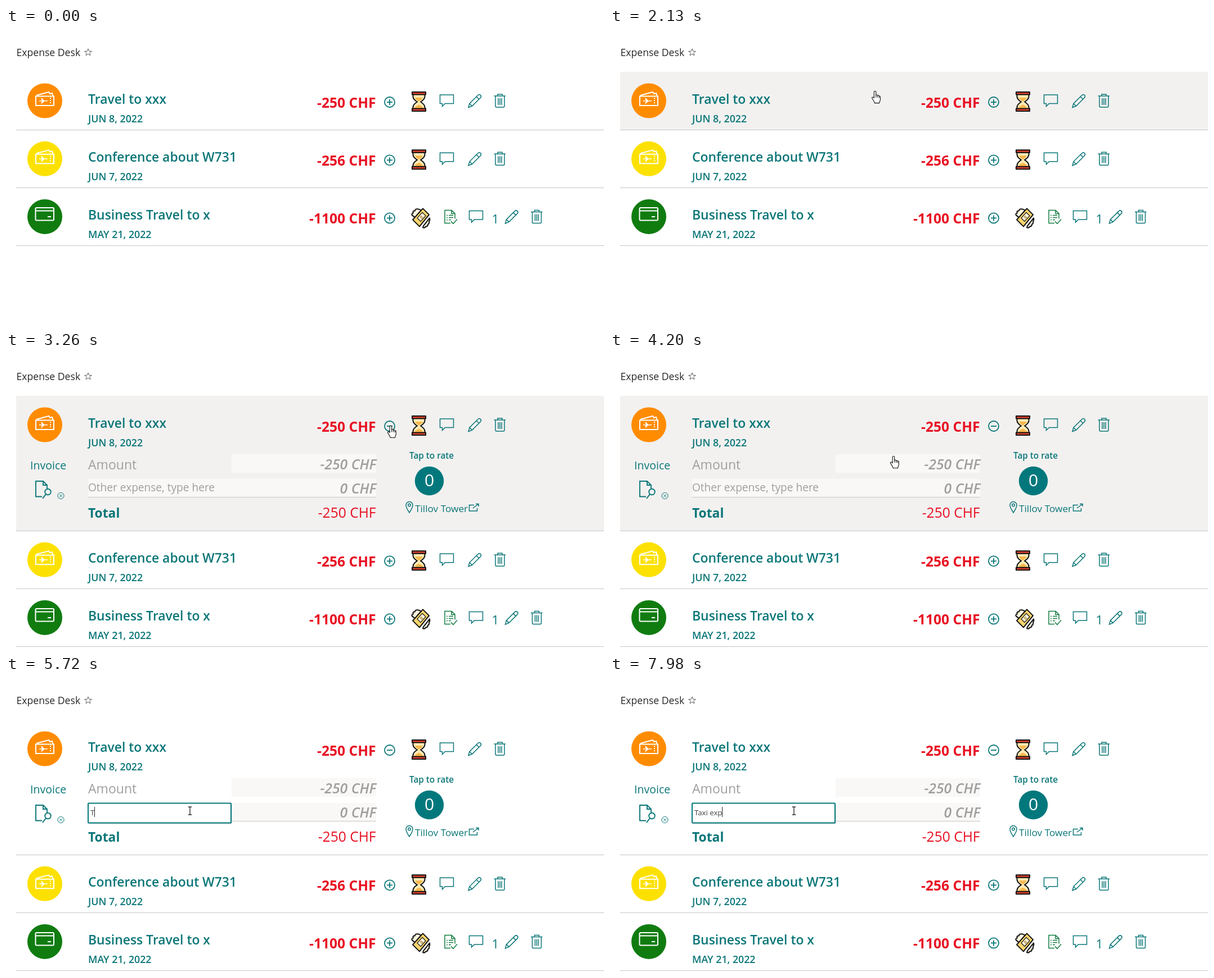
Recreate the animation shown at these times as an HTML page. Size 1063 px wide and 527 px high, loop 8000 ms.

```html
<!DOCTYPE html>
<html lang="en">
<head>
<meta charset="utf-8">
<title>Expense list</title>
<style>
  html, body { margin: 0; width: 100%; height: 100%; overflow: hidden; background: #fff; }
  svg { display: block; width: 1063px; height: 527px; font-family: "Open Sans", "Noto Sans", sans-serif; }
  text { fill: #0b7678; white-space: pre; }
  .title { font-size: 22.9px; font-weight: 600; }
  .date { font-size: 17.8px; font-weight: 600; }
  .sum { font-size: 24.6px; text-anchor: end; fill: #e81123; }
  .bold { font-weight: 700; }
  .gray { fill: #a19f9d; }
  .faded { fill: #a19f9d; font-size: 24.8px; font-style: italic; font-weight: 600; }
  .icon { fill: none; stroke: #0b7678; stroke-width: 1.5; }
  .white { fill: none; stroke: #fff; stroke-width: 2; }
  .rule { fill: #c8c6c4; shape-rendering: crispEdges; }
  .field { fill: #f9f8f7; }
  .ink { stroke: #111; stroke-width: 2; stroke-linejoin: round; }
  .cursor { fill: #fff; stroke: #111; stroke-width: 1.1; stroke-linejoin: round; }
</style>
</head>
<body>
<svg id="stage" viewBox="0 0 1063 527">
  <defs>
    <g id="ticket" class="white">
      <path d="M54 42l22-6 2 3 4-1 1.500 5M53 43.500h32v16.500h-32z"/>
      <path d="M79 46v12" stroke-dasharray="2 2"/>
      <path d="M59 51h5l-2-4h2l4 4h6v1.500h-6l-4 4h-2l2-4h-5z" fill="#fff" stroke="none"/>
    </g>
    <g id="card" class="white">
      <rect x="52.500" y="35.500" width="32.500" height="22.500" rx="2"/>
      <path d="M53 41h32M74 51.500h6"/>
    </g>
    <g id="hourglass" class="ink">
      <path d="M723.500 40v4q0 5 7.500 9.500q-7.500 4.500-7.500 10v3h21v-3q0-5.500-7.500-10q7.500-4.500 7.500-9.500v-4z" fill="#ffeab5"/>
      <path d="M727 46h14q-1 3-7 7q-6-4-7-7zM726 66q1-5 8-7.500q7 2.500 8 7.500z" fill="#f8b84c" stroke="none"/>
      <path d="M722 36h24v4.500h-24zM722 65.500h24v4.500h-24z" fill="#e0402d"/>
    </g>
    <g id="money" class="ink" fill="#fff8de">
      <path d="M722 49q-2-3 2-4q-2-4 3-4q0-4 6-3l5 2-11 13z"/>
      <path d="M742 68l11-14q1 4-1 6q1 4-2 5q0 4-4 4q-1 3-5 2z"/>
      <path d="M723 57l18-20 11 11-17 21z" fill="#f6d46c"/>
      <path d="M731 54l9-10 6 6-9 10z" stroke-width="1.300"/>
      <path d="M736 53l3-3M738 55l3-3" stroke="#a8812d" stroke-width="1.500"/>
    </g>
    <path id="comment" class="icon" d="M771.500 41h24v15.500h-15l-5 5v-5h-4z"/>
    <path id="pencil" class="icon" d="M822 63.500l2-7 15-15q2.500-2 4.500 0t0 4.500l-15 15zM836.500 44.500l4.500 4.500M824 56.500l4.500 4.500"/>
    <path id="trash" class="icon" d="M867.500 43h20.500M874 43v-3h8v3M870 43v18q0 2 2 2h12q2 0 2-2v-18M875 47v12M878 47v12M881 47v12"/>
    <path id="form" class="icon" style="stroke:#107c41" d="M790 63h-10v-23h12l6 6v9M792 40v6h6M783 49h2M787 49h8M783 53h2M787 53h8M783 57h2M787 57h4M791 60l4 4 7-8"/>
  </defs>

  <text x="18.500" y="50" style="font-size:17.600px;fill:#292827">Expense Desk</text>
  <path d="M146 37l1.700 4.300 4.700.2-3.700 2.900 1.300 4.500-4-2.600-4 2.600 1.300-4.500-3.700-2.900 4.700-.2z" fill="none" stroke="#605e5c"/>
  <g id="rows"></g>

  <g id="details">
    <text x="43" y="208.500" font-size="19.500">Invoice</text>
    <g class="icon">
      <path d="M64 257.500h-11v-27.500h13l7 7v6M66 230v7h7" stroke-width="1.900"/>
      <circle cx="74.500" cy="249" r="5.300" stroke-width="1.900"/>
      <path d="M71 253l-6 8" stroke-width="2"/>
      <g stroke-width="1"><circle cx="97.500" cy="256" r="5.600"/><path d="M95 253.500l5 5M100 253.500l-5 5"/></g>
    </g>
    <text class="gray" x="146" y="208.500" font-size="23">Amount</text>
    <rect class="field" x="401" y="182" width="257" height="33"/>
    <text class="sum faded" x="658" y="208.500">-250 CHF</text>
    <rect class="field" x="146" y="226" width="512" height="32"/>
    <rect class="rule" x="146" y="258" width="512" height="1"/>
    <text class="sum faded" x="658" y="251.500">0 CHF</text>
    <text id="hint" class="gray" x="146" y="247.500" font-size="19.100">Other expense, type here</text>
    <rect id="outline" x="146" y="226.500" width="254" height="34" fill="none" stroke="#7fb5b7"/>
    <g id="loading">
      <rect x="145" y="226" width="256" height="38" fill="#f2f1f0"/>
      <rect x="146" y="233.500" width="254" height="30" fill="#f9f9f8" stroke="#6fafb2" stroke-width="1.600"/>
      <circle cx="273.500" cy="248.500" r="9.500" fill="none" stroke="#dcdcdb"/>
      <path d="M590.500 226v32" stroke="#777"/>
    </g>
    <g id="editor">
      <rect x="147" y="228" width="255" height="36" rx="2" fill="#ddd"/>
      <rect x="146" y="226.500" width="254" height="35" rx="1" fill="#fff" stroke="#03787c" stroke-width="2"/>
      <text id="typed" x="150" y="248" font-size="13.200" style="fill:#444"></text>
      <rect id="caret" y="233" width="1" height="18" fill="#222"/>
    </g>
    <text class="bold" x="146" y="295" font-size="22.800">Total</text>
    <text class="sum" x="657.500" y="295">-250 CHF</text>
    <text x="717" y="190" font-size="15.300" font-weight="600">Tap to rate</text>
    <circle cx="752.500" cy="229.500" r="25.700" fill="#03787c"/>
    <text x="752.500" y="238.500" font-size="30" text-anchor="middle" style="fill:#fff">0</text>
    <g class="icon" stroke-width="1.300">
      <path d="M717 286q-6-9-6-13.500a6 6 0 0 1 12 0q0 4.500-6 13.500z"/><circle cx="717" cy="272.500" r="2.300"/>
      <path d="M832 272.500h-8.500v10.500h14v-5M830 278l9.500-7M835 270.500h5v4.500"/>
    </g>
    <text x="727" y="285" font-size="17.200">Tillov Tower</text>
  </g>

  <circle id="click" cx="683" cy="132" r="11" fill="#e6df2e"/>
  <g id="pointer" class="cursor">
    <path id="arrow" d="M0 0v17l4-3.800 2.800 6.300 2.600-1.200-2.700-6h5.500z"/>
    <path id="hand" d="M-1.800 12.500V1.800C-1.800-.4 1.600-.4 1.600 1.800V7.500C2.500 6.400 4.500 6.800 4.600 8.300C5.500 7.300 7.300 7.800 7.300 9.300C8.300 8.700 9.300 9.300 9.300 10.500V15C9.300 18 7.500 18.500 7.500 21.500H-.8C-1 18.500-3.500 17-5.300 12.800C-6 10.500-3.500 10-1.800 12.500zM1.600 7.500v4M4.600 8.300v3.500M7.300 9.300v3"/>
    <path id="beam" d="M-2.500-6.500h2l1 1 1-1h2M.5-5.500v12M-2.500 7.500h2l1-1 1 1h2" fill="none" stroke="#222" stroke-width="1.300"/>
  </g>
</svg>
<script>
const LOOP = 8000, OPEN = 3260, LOAD = 4680, EDIT = 4890;
const $ = id => document.getElementById(id);
const show = (id, on) => $(id).style.display = on ? '' : 'none';
const use = (id, dx = 0) => `<use href="#${id}" x="${dx}"/>`;

const items = [
  { top: 78, color: '#ff8c00', icon: 'ticket', title: 'Travel to xxx', date: 'JUN 8, 2022', sum: '-250 CHF' },
  { top: 181.3, color: '#fce100', icon: 'ticket', title: 'Conference about W731', date: 'JUN 7, 2022', sum: '-256 CHF' },
  { top: 284.4, color: '#107c10', icon: 'card', title: 'Business Travel to x', date: 'MAY 21, 2022', sum: '-1100 CHF', paid: true },
];

$('rows').innerHTML = items.map((r, i) => `<g id="row${i}">
  <rect id="hover${i}" x="18" width="1045" height="103" fill="#f2f1f0"/>
  <rect id="rule${i}" class="rule" x="18" y="103" width="1045" height="1"/>
  <circle cx="69" cy="51.500" r="31" fill="${r.color}"/>${use(r.icon)}
  <text class="title" x="146" y="57">${r.title}</text>
  <text class="date" x="146" y="89.500">${r.date}</text>
  <text class="sum bold" x="657.500" y="64">${r.sum}</text>
  <g class="icon" style="stroke-width:1.800"><circle cx="682" cy="54" r="9"/><path d="M677 54h10"/><path id="plus${i}" d="M682 49v10"/></g>
  ${use(r.paid ? 'money' : 'hourglass')}
  ${r.paid ? use('form') + '<text x="863.500" y="63.500" font-size="22.500">1</text>' : ''}
  ${use('comment', r.paid ? 52 : 0)}${use('pencil', r.paid ? 65.5 : 0)}${use('trash', r.paid ? 65.5 : 0)}
</g>`).join('');

// time, x, y of the pointer tip
const path = [[1010, 345, 520], [1500, 365, 264], [1780, 378, 112], [1850, 379, 104],
              [2620, 684, 131], [3920, 684, 131], [4480, 326, 239]];
const keyTimes = [5720, 5990, 6260, 6390, 6590, 6850, 7050, 7980];

function pointerAt(t) {
  const i = path.findIndex(p => p[0] > t);
  if (i < 0) return path[path.length - 1].slice(1);
  const [t0, x0, y0] = path[Math.max(i - 1, 0)], [t1, x1, y1] = path[i];
  let k = Math.max(0, (t - t0) / (t1 - t0));
  if (t0 >= 1850) k = k * k * (3 - 2 * k);
  return [x0 + (x1 - x0) * k, y0 + (y1 - y0) * k];
}

function hoveredRow(t) {
  if (t < 1290 || t >= EDIT) return -1;
  return t < 1570 ? 2 : t < 1710 ? 1 : 0;
}

function draw(t) {
  const open = t >= OPEN, editing = t >= EDIT, loading = t >= LOAD && !editing;
  const [x, y] = pointerAt(t), hovered = hoveredRow(t);

  items.forEach((r, i) => {
    $('row' + i).setAttribute('transform', `translate(0 ${r.top + (open && i ? 137 : 0)})`);
    show('hover' + i, i === hovered);
  });
  $('hover0').setAttribute('height', open ? 240 : 103);
  $('rule0').setAttribute('y', open ? 240 : 103);
  show('plus0', !open);

  show('details', open);
  show('hint', t < LOAD);
  show('outline', t > 3920 && t < LOAD && x < 400);
  show('loading', loading);
  show('editor', editing);
  $('typed').textContent = 'Taxi exp'.slice(0, keyTimes.filter(k => t >= k).length);
  if (editing) $('caret').setAttribute('x', Math.round(150 + $('typed').getComputedTextLength()));
  show('caret', t < 5440 || (t >= 5720 && t < 7650) || t >= 7980);

  const glow = Math.min((t - 2620) / 140, (3160 - t) / 140, 1);
  $('click').setAttribute('opacity', Math.max(0, glow) * .75);

  show('pointer', t >= 1010);
  $('pointer').setAttribute('transform', editing ? 'translate(326.500 239.500)' : `translate(${x} ${y})`);
  show('arrow', y > 388);
  show('hand', y <= 388 && !editing);
  show('beam', editing);
}

function tick() {
  draw(performance.now() % LOOP);
  requestAnimationFrame(tick);
}
tick();
</script>
</body>
</html>
```
